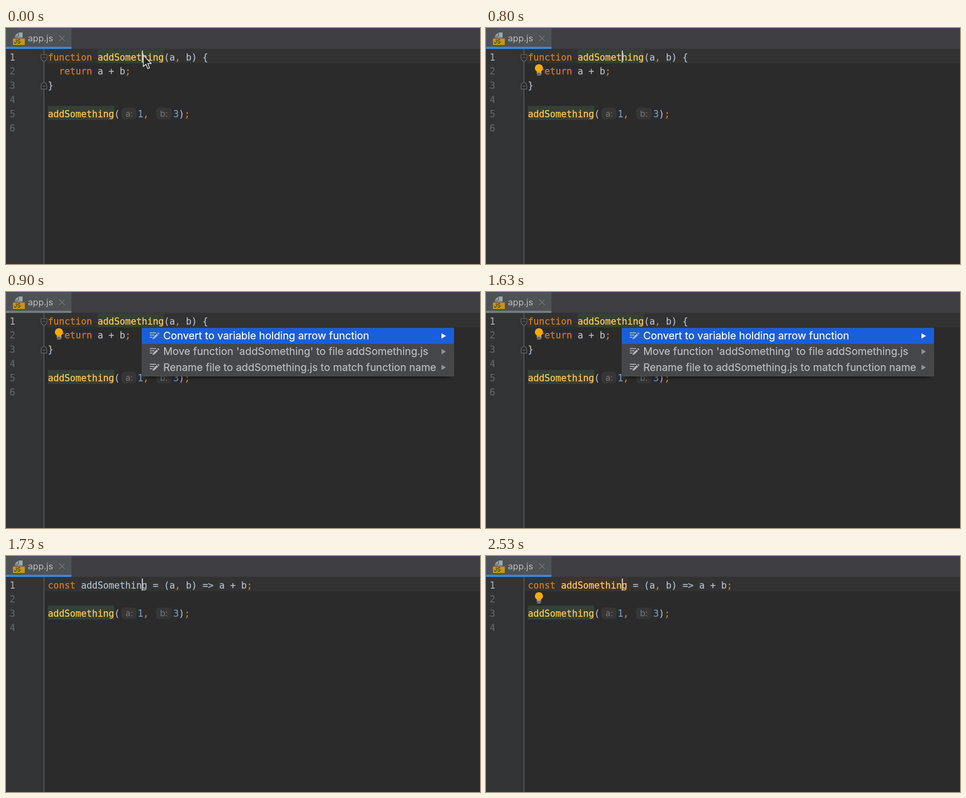
Recreate the animation shown at these times as an HTML page. Size 1058 by 529 pixels, loop 4730 ms.

```html
<!DOCTYPE html>
<html lang="en">
<head>
<meta charset="utf-8">
<title>Editor</title>
<style>
  html, body { margin: 0; width: 100%; height: 100%; overflow: hidden; background: #2b2b2b; }
  svg { display: block; width: 100%; height: 100%; }
  text { white-space: pre; }
  .code { font: 20.48px "DejaVu Sans Mono", monospace; stroke-width: .4; }
  .ui { font-family: Inter, sans-serif; }
  .item { font-size: 23.1px; stroke-width: .25; }
</style>
</head>
<body>
<svg viewBox="0 0 1058 529">
  <defs>
    <filter id="blur" x="-5%" y="-20%" width="110%" height="140%">
      <feGaussianBlur stdDeviation="5"/>
    </filter>
    <g id="editIcon" fill="none" stroke="currentColor" stroke-width="2">
      <path d="M0 -6.5H14M0 -1.5H10M0 3.5H6"/>
      <path d="M9 5L17 -3" stroke-width="4.4"/>
      <path d="M18.2 -4.2L20 -6" stroke-width="4.4"/>
      <path d="M6 8L7.2 3.5L10.5 6.8Z" fill="currentColor" stroke="none"/>
    </g>
  </defs>

  <rect width="1058" height="529" fill="#2b2b2b"/>
  <rect width="1058" height="47" fill="#3f3e43"/>
  <rect y="46.5" width="84" height="483" fill="#313335"/>
  <rect x="85" y="46.5" width="973" height="32.5" fill="#323232"/>
  <path d="M84.7 47V529" stroke="#606366" stroke-width="1.6"/>

  <rect width="146" height="47" fill="#4e5254"/>
  <path d="M28.5 10H37V21.5H19.5V19.5H28.5Z" fill="#9aa7b0"/>
  <path d="M19.5 18L27 10.5V18Z" fill="#9aa7b0"/>
  <rect x="15.5" y="23.5" width="26.5" height="14.5" fill="#c9941a"/>
  <text class="ui" x="17.5" y="35.3" font-size="12.5" font-weight="500" fill="#3b321c">JS</text>
  <text class="ui" x="49" y="30" font-size="19.8" fill="#bbbbbb">app.js</text>
  <path d="M119 17L131 29M131 17L119 29" stroke="#73787b" stroke-width="1.5"/>
  <rect id="blurred" y="42" width="146" height="5" fill="#747a80"/>
  <rect id="focused" y="42" width="146" height="5" fill="#3c85d6"/>

  <g id="before"></g>
  <g id="after"></g>
  <g id="bulb">
    <path d="M114 99.5C114 96.5 109 95 109 90A9.1 9.1 0 0 1 127.2 90C127.2 95 122.3 96.5 122.3 99.5Z" fill="#f5aa0c"/>
    <path d="M113 101.2H123.2M113.8 105H122.4" stroke="#c3c6c8" stroke-width="1.7"/>
  </g>
  <rect id="caret" x="303" y="50.5" width="2.6" height="27" fill="#c4c4c4"/>
  <path id="pointer" d="M306.5 61V86.5L312.3 81.2L316.5 91L320.6 89.2L316.4 79.6H324.2Z"
        fill="#242424" stroke="#dedede" stroke-width="1.7" stroke-linejoin="round"/>
  <rect id="shadow" x="314" y="120" width="675" height="72" fill="#000" opacity=".5" filter="url(#blur)"/>
  <g id="popup"></g>
</svg>
<script>
const LOOP = 4730, LEFT = 93.5, CHAR = 12.33, LINE = 31.8;
// Keyword, function name, plain text, digit.
const COLOR = { k: '#d5791a', n: '#fdc650', t: '#a9b7c6', d: '#6897bb' };
const GREEN = '#344134', BROWN = '#40332b';
const byId = id => document.getElementById(id);

function add(parent, tag, attrs, text = '') {
  const node = document.createElementNS('http://www.w3.org/2000/svg', tag);
  for (const key in attrs) node.setAttribute(key, attrs[key]);
  node.textContent = text;
  parent.append(node);
  return node;
}

const baseline = line => 72.6 + (line - 1) * LINE;
const column = col => LEFT + col * CHAR;
const paint = color => ({ fill: color, stroke: color });

// Each token is a colour key followed by its text.
function code(parent, line, x, ...tokens) {
  return tokens.map(token => {
    const text = token.slice(1);
    const node = add(parent, 'text', { class: 'code', x, y: baseline(line), ...paint(COLOR[token[0]]) }, text);
    x += text.length * CHAR;
    return node;
  });
}

function mark(parent, line, col, fill) {
  return add(parent, 'rect', {
    x: column(col), y: 47.5 + (line - 1) * LINE, width: 12 * CHAR, height: 31.5, fill
  });
}

function hint(parent, line, x, width, text) {
  const y = baseline(line);
  add(parent, 'rect', { x, y: y - 21, width, height: 26, rx: 7, fill: '#363636' });
  add(parent, 'text', { class: 'ui', x: x + 9, y: y - 1, 'font-size': 19, fill: '#787878' }, text);
}

function call(parent, line) {
  mark(parent, line, 0, GREEN);
  code(parent, line, LEFT, 'naddSomething', 't(');
  hint(parent, line, 258, 33, 'a:');
  code(parent, line, 294, 'd1', 'k,');
  hint(parent, line, 335, 35, 'b:');
  code(parent, line, 373.5, 'd3', 't)', 'k;');
}

function numbers(parent, count) {
  for (let i = 1; i <= count; i++) {
    add(parent, 'text', {
      class: 'code', x: 8.3, y: baseline(i), ...paint(i === 1 ? '#a4a3a3' : '#606366')
    }, i);
  }
}

function fold(parent, y, flip) {
  const g = add(parent, 'g', {
    transform: `translate(84.7 ${y}) scale(1 ${flip})`, stroke: '#66696b', 'stroke-width': 1.4
  });
  add(g, 'path', { d: 'M-6.3 -8H6.3V2.5L0 8L-6.3 2.5Z', fill: '#2d2e2f' });
  add(g, 'path', { d: 'M-3.3 -1.5H3.3' });
}

const before = byId('before');
numbers(before, 6);
fold(before, 67.5, 1);
fold(before, 129, -1);
mark(before, 1, 9, GREEN);
code(before, 1, LEFT, 'kfunction ', 'naddSomething', 't(a', 'k,', 't b) {');
code(before, 2, column(2), 'kreturn', 't a + b', 'k;');
code(before, 3, LEFT, 't}');
call(before, 5);

const after = byId('after');
numbers(after, 4);
const declaredMark = mark(after, 1, 6, BROWN);
const [, declared] = code(after, 1, LEFT, 'kconst ', 'naddSomething', 't = (a', 'k,', 't b) => a + b', 'k;');
call(after, 3);

const popup = byId('popup');
add(popup, 'rect', {
  x: 303.5, y: 80.5, width: 696, height: 108, fill: '#46474b', stroke: '#505155'
});
add(popup, 'rect', { x: 303, y: 81, width: 697, height: 35, fill: '#195fdc' });
[
  'Convert to variable holding arrow function',
  "Move function 'addSomething' to file addSomething.js",
  'Rename file to addSomething.js to match function name'
].forEach((label, i) => {
  const y = 98 + i * 35.3;
  add(popup, 'use', { href: '#editIcon', x: 321, y, color: '#b4b6b9' });
  add(popup, 'text', { class: 'ui item', x: 351, y: y + 8, ...paint(i ? '#bdbdbf' : '#ffffff') }, label);
  add(popup, 'path', { d: `M972 ${y - 5.5}L982 ${y + .5}L972 ${y + 6.5}Z`, fill: i ? '#919295' : '#fff' });
});

const steps = [
  [0, 'before focused caret pointer'],
  [530, 'before focused caret pointer bulb'],
  [800, 'before focused caret bulb'],
  [860, 'before blurred bulb popup'],
  [900, 'before blurred bulb popup shadow'],
  [1660, 'before blurred bulb'],
  [1700, 'before focused caret bulb'],
  [1730, 'after focused caret'],
  [2530, 'after focused caret bulb']
].map(([start, names]) => [start, new Set(names.split(' '))]);
const parts = ['before', 'after', 'focused', 'blurred', 'caret', 'pointer', 'bulb', 'popup', 'shadow'].map(byId);

function draw(now) {
  const time = now % LOOP;
  const [, shown] = steps.findLast(([start]) => start <= time);
  for (const part of parts) part.style.display = shown.has(part.id) ? '' : 'none';

  // Name highlighting arrives shortly after the code is rewritten.
  const analysed = time >= 2000;
  declaredMark.style.display = analysed ? '' : 'none';
  declared.style.fill = declared.style.stroke = analysed ? COLOR.n : COLOR.t;
}

const origin = performance.now();
function tick() {
  draw(performance.now() - origin);
  requestAnimationFrame(tick);
}
tick();
</script>
</body>
</html>
```
